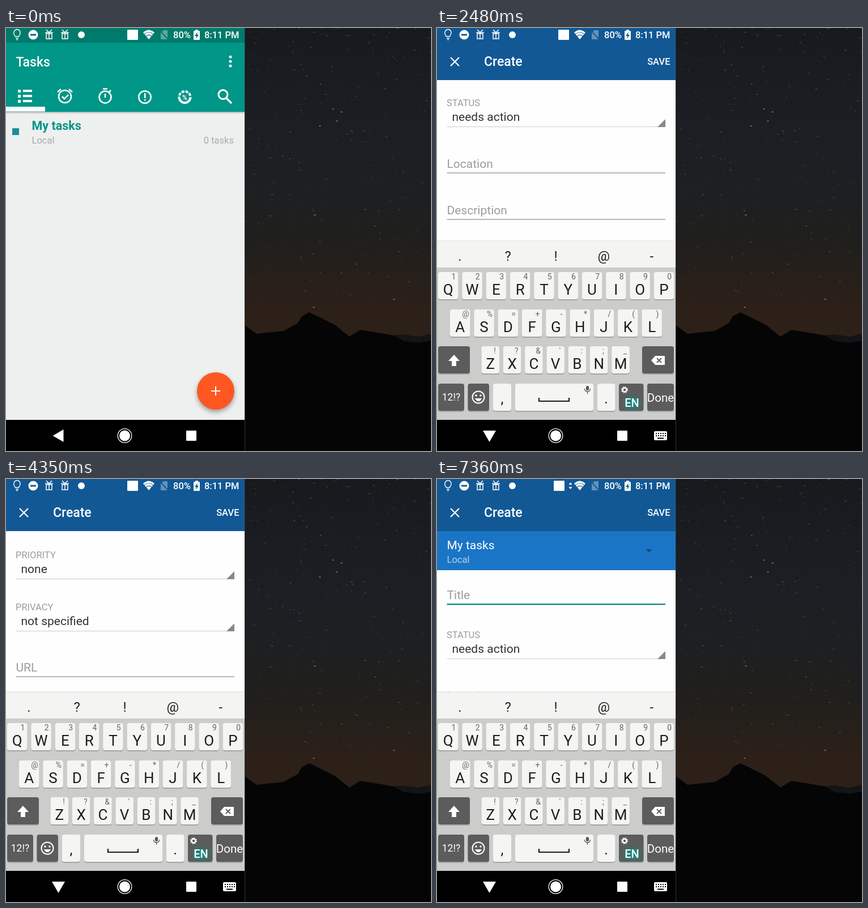
An HTML page that plays this animation: 750x747 px, repeating every 7.45 s.

```html
<!DOCTYPE html>
<html lang="en">
<head>
<meta charset="utf-8">
<title>Tasks</title>
<style>
html, body { margin: 0; width: 100%; height: 100%; overflow: hidden; background: #000; }
svg { display: block; width: 100%; height: 100%; }
text { font-family: Roboto, "Noto Sans", sans-serif; white-space: pre; }
</style>
</head>
<body>
<script>
const LOOP = 7450;
const W = '#fff', TEAL = '#009688', NAVY = '#125895', HINT = '#9c9c9c', INK = '#333';

// Markup helpers
const rect = (x, y, w, h, fill, r = 0, more = '') =>
  `<rect x="${x}" y="${y}" width="${w}" height="${h}" fill="${fill}" rx="${r}" ${more}/>`;
const circle = (x, y, r, fill, more = '') => `<circle cx="${x}" cy="${y}" r="${r}" fill="${fill}" ${more}/>`;
const ring = (x, y, r, width, more = '') =>
  circle(x, y, r, 'none', `stroke="${W}" stroke-width="${width}" ${more}`);
const shape = (d, fill) => `<path d="${d}" fill="${fill}"/>`;
const line = (d, stroke = W, width = 2) =>
  `<path d="${d}" fill="none" stroke="${stroke}" stroke-width="${width}"/>`;
const text = (x, y, s, size, fill, more = '') =>
  `<text x="${x}" y="${y}" font-size="${size}" fill="${fill}" ${more}>${s.replace('&', '&amp;')}</text>`;
const group = (body, more = '') => `<g ${more}>${body}</g>`;
const move = (x, y, body) => group(body, `transform="translate(${x} ${y})"`);
const MID = 'text-anchor="middle"', END = 'text-anchor="end"', MEDIUM = 'font-weight="500"';

function wallpaper() {
  let seed = 7;
  const rnd = () => (seed = seed * 16807 % 2147483647) / 2147483647;
  let stars = '';
  for (let i = 0; i < 900; i++) {
    const x = rnd() * 750, y = 480 * rnd() ** 1.6, len = 1 + rnd() * 2.5;
    const tone = rnd() < .2 ? '#a08058' : '#a4a6a4';
    stars += `<path d="M${x.toFixed(1)} ${y.toFixed(1)}l${len.toFixed(1)} .5" stroke="${tone}" opacity="${(.08 + rnd() ** 3 * .5).toFixed(2)}"/>`;
  }
  const bright = [[554, 173], [584, 164], [577, 143], [592, 148], [545, 330], [543, 493], [685, 479]]
    .map(([x, y]) => rect(x - 1.5, y - .5, 3, 1.5, '#a5804c', .5)).join('');
  return rect(0, 0, 750, 747, 'url(#sky)') + stars + bright +
    shape('M660 545L700 541 728 545 750 540V580H660Z', '#131415') +
    shape('M0 495L30 495 45 505 80 522 110 518 150 505 190 512 225 512 238 488 272 487 285 500 318 512 345 493 367 478 385 490 390 512 412 518 442 540 490 535 515 521 522 509 535 502 552 510 580 524 606 545 625 533 650 537 685 543 702 553 730 556 750 552V747H0Z', '#050505');
}

// Status bar icons; dx moves the right-hand cluster
const nfc = rect(214, 3, 19, 18, W, 1);
function status(dx, showNfc) {
  const parcel = x => line(`M${x - 5} 10h10v9h-10zM${x - 7} 8h14M${x} 8v11M${x} 8l-5-5M${x} 8l5-5`, W, 1.5);
  const right = (showNfc ? nfc : '') +
    shape('M242 8Q251.500 -1 262 8L252 20Z', W) +
    line('M244 11Q252 4 260 11M247 14.500Q252 10 257 14.500', '#3c7ba5', 1.200) +
    group(shape('M273 9L278 4H285V20H273Z', W) + line('M271 4L286 20', '#2a6d90', 2), 'opacity=".35"') +
    text(295, 18, '80%', 16.500, W, MEDIUM) +
    rect(331, 5, 11, 16, W, 1) + rect(334, 3, 5, 3, W) +
    shape('M338 7L333 14H336L335 19 340 12H337Z', '#126377') +
    text(411.500, 18, '8:11 PM', 16.500, W, MEDIUM + ' ' + END);
  return line('M16.500 15Q13 11 14 7Q16 2.500 19.500 2.500Q23.500 2.500 25 7Q25.500 11 22.500 15ZM17 18H22M18 20.500H21', W, 1.400) +
    circle(48, 12, 8.500, W) + rect(43, 10.500, 10, 3, '#16627e') +
    parcel(76) + parcel(104) + circle(133, 12, 6, W) + move(dx, 0, right);
}

// System navigation
const back = (x, y) => shape(`M${x - 10} ${y}L${x + 9} ${y - 11}V${y + 11}Z`, W);
const home = (x, y) => ring(x, y, 12.300, 1.300) + circle(x, y, 9.500, W);
const square = (x, y) => rect(x - 9, y - 9, 18, 18, W, 1);

function keyboardIcon() {
  let dots = '';
  for (let i = 0; i < 10; i++) dots += rect(386 + i % 5 * 4, 715 + (i / 5 | 0) * 4, 2, 2, '#000');
  return rect(383, 712, 23, 16, W, 2) + dots + rect(389, 723.500, 11, 2, '#000');
}

function listScreen() {
  const bullets = [109, 118, 127].map(y => rect(21, y, 5, 5, W) + rect(30, y, 16, 4, W)).join('');
  const tabs = bullets +
    ring(104, 121, 11, 2.500) + line('M99 121l4 4 7-7M91 113l6-5M117 113l-6-5', W, 2.500) +
    ring(175, 122, 10.500, 2.500) + line('M171 107.500h8M175 116v7M182 113l3-3', W, 2.500) +
    ring(245, 122, 10.800, 2.500) + rect(244, 115, 2.500, 9, W) + rect(244, 126, 2.500, 2.500, W) +
    ring(315.500, 122, 10, 4, 'stroke-dasharray="32 2 5 2 5 2 5 2 5 3"') + text(315.500, 126.500, '%', 12, W, MID + ' font-weight="700"') +
    ring(383, 117.500, 8, 3) + line('M389 124l9 9', W, 3.500);
  return rect(0, 0, 421, 692, '#eef0ef') +
    rect(0, 147, 421, 5, 'url(#shade)') + rect(0, 25, 421, 123, TEAL) + rect(0, 0, 421, 26, '#007a6b') +
    text(17.500, 67.500, 'Tasks', 23, W, MEDIUM) +
    [51, 59, 67].map(y => circle(396, y, 2.500, W)).join('') + tabs + rect(0, 139, 69, 8.500, W) +
    rect(11, 177, 12, 12, '#1f8c98') + text(45.500, 180, 'My tasks', 21.500, TEAL, 'font-weight="700"') +
    text(45.500, 203.500, 'Local', 16.500, '#a9aaaa') + text(402, 203.500, '0 tasks', 16.500, '#a9aaaa', END) +
    circle(370, 645, 33, '#000', 'opacity=".35" filter="url(#blur)"') + circle(370, 641, 33, '#ff5722') +
    circle(370, 641, 0, W, 'id="ripple" opacity=".3"') + line('M362 641h16M370 633v16', W, 2);
}

// Form laid out from the top of the unscrolled page; w is the page width
function form(w) {
  const right = w - 18;
  const corner = (x, y) => shape(`M${x} ${y}h-14l14-14z`, '#888');
  const label = (y, s, x = 17) => text(x, y + 6, s, 16.500, HINT);
  const hint = (y, s) => text(17.500, y + 7, s, 21, HINT) + rect(17.500, y + 15.500, right - 17.500, 1.200, '#8a8a8a');
  const select = (y, name, value) => label(y, name) + text(26.500, y + 32, value, 21, INK) +
    rect(17.500, y + 42, right - 17.500, 1, '#ccc') + corner(right, y + 43);
  const date = (y, name) => rect(13, y + 2, 188, 51, '#dddedc') + rect(206, y + 2, 150, 51, '#dddedc') +
    rect(17, y + 52, 184, 1, '#bbb') + rect(210, y + 52, 146, 1, '#bbb') +
    corner(201, y + 52) + corner(356, y + 52) + label(y, name) +
    line(`M376 ${y + 21}l16 16m0-16l-16 16`, '#666', 2);
  return rect(0, 92, w, 1060, '#fefefe') + rect(0, 90, w, 71, '#1a75c6') +
    text(17.500, 124, 'My tasks', 21, W) + text(17.500, 147.500, 'Local', 16.500, '#b4d3ee') +
    shape(`M${w - 53} 124h12l-6 6z`, '#164a78') +
    text(17.500, 212, 'Title', 21, HINT) + rect(17.500, 220, right - 17.500, 2.400, '#148a8c') +
    select(275, 'STATUS', 'needs action') + hint(383, 'Location') + hint(465, 'Description') +
    date(545, 'START') + date(637, 'DUE') +
    `<rect x="22" y="737" width="18.500" height="18.500" rx="1" fill="none" stroke="#777" stroke-width="2.200"/>` +
    label(746, 'ALL DAY', 50) + select(809, 'TIME ZONE', '(GMT+08:00) Taipei') +
    select(901, 'PRIORITY', 'none') + select(993, 'PRIVACY', 'not specified') + hint(1100, 'URL');
}

const toolbar = (w, h, y, size) => rect(0, 0, w, h, NAVY) +
  line(`M24 ${y - 7}l15 15m0-15l-15 15`, W, 2.300) +
  text(83, y + size * .36, 'Create', size, W, MEDIUM) +
  text(w - 9.500, y + 6, 'SAVE', 16.500, W, MEDIUM + ' ' + END);

function keyboard() {
  const LIGHT = '#f5f5f3', DARK = '#5b5c5b';
  const key = (x, y, w, fill) => rect(x, y + 2, w, 48, '#a5a6a4', 4) + rect(x, y, w, 48, fill, 4);
  const row = (letters, hints, x, y, step, w) => [...letters].map((c, i) => {
    const k = x + i * step;
    return key(k, y, w, LIGHT) + text(k + w / 2, y + 40, c, 26, '#1c1c1c', MID) +
      text(k + w - 8, y + 13, hints[i], 14, '#666', MID);
  }).join('');
  const marks = [...'.?!@-'].map((c, i) => text(40.500 + i * 84.600, 411, c, 24, '#222', MID)).join('');
  return rect(0, 376, 421, 316, '#cccdcb') + rect(0, 376, 421, 47, '#f4f4f2') + rect(0, 375.500, 421, 1, '#ddd') + marks +
    row('QWERTYUIOP', '1234567890', 2, 431, 42.300, 35.500) +
    row('ASDFGHJKL', '@%=+-*/()', 23, 497, 42.300, 35.500) +
    row('ZXCVBNM', "!?&':;_", 78.500, 562, 38.300, 31.500) +
    key(2, 562, 56, DARK) + shape('M30 577l10 11h-6v9h-8v-9h-6z', W) +
    key(362, 562, 56, DARK) + shape('M378 587l7-8h17v16h-17z', W) + line('M388 583l8 8m0-8l-8 8', DARK, 2) +
    key(2, 628, 46, DARK) + text(25, 658, '12!?', 17.500, W, MID) +
    key(54.500, 628, 37.500, DARK) + ring(73, 652, 10.500, 2) + circle(69, 649, 1.700, W) + circle(77, 649, 1.700, W) +
    shape('M67 654h12q-2 5-6 5t-6-5z', W) +
    key(99, 628, 32, LIGHT) + text(115, 663, ',', 25, '#1c1c1c', MID) +
    key(138, 628, 138, LIGHT) + line('M180 653v6h53v-6', '#1c1c1c', 2.200) +
    rect(263, 632, 5, 8, '#555', 2.500) + line('M260.500 637q0 5 5 5t5-5M265.500 642v4', '#555', 1.300) +
    key(283, 628, 31.500, LIGHT) + text(298.500, 663, '.', 25, '#1c1c1c', MID) +
    key(321, 628, 43.500, DARK) + rect(333, 654, 23, 16, '#0e8f88', 3, 'filter="url(#blur)"') + ring(331, 639, 3.500, 2.500) +
    ring(331, 639, 5.300, 1.500, 'stroke-dasharray="2 2.160"') +
    text(344, 669, 'EN', 20, W, MID + ' ' + MEDIUM) +
    key(371, 628, 47, DARK) + text(394.500, 660, 'Done', 20.500, W, MID);
}

function landscape() {
  return rect(0, 0, 750, 458, '#000') +
    group(move(0, -9, form(693)) + toolbar(693, 82, 54, 16.500), 'clip-path="url(#page)"') + status(273, true) +
    square(722, 91) + home(722, 209) + back(722, 326) +
    rect(0, 420, 750, 38, '#4696e3') + line('M127 432.500l-6 6 6 6', W, 3) + ring(374, 438.500, 6, 2) +
    [434, 438.500, 443].map(y => rect(618, y - 1, 13, 2.200, W)).join('');
}

const gradient = (id, stops) => `<linearGradient id="${id}" x2="0" y2="1">` +
  stops.map(([at, c, o = 1]) => `<stop offset="${at}" stop-color="${c}" stop-opacity="${o}"/>`).join('') + '</linearGradient>';

document.body.innerHTML = `<svg viewBox="0 0 750 747"><defs>` +
  gradient('sky', [[0, '#17191d'], [.25, '#1b1f24'], [.42, '#1e1f20'], [.53, '#211f1c'], [.64, '#2b2019'], [.7, '#2d2018'], [1, '#2d2018']]) +
  gradient('shade', [[0, '#000', .3], [1, '#000', 0]]) +
  `<filter id="blur" x="-50%" y="-50%" width="200%" height="200%"><feGaussianBlur stdDeviation="4"/></filter>
  <clipPath id="page"><rect width="694" height="420"/></clipPath></defs>` +
  wallpaper() +
  group(rect(0, 0, 421, 747, '#000') + rect(421, 0, 1, 747, '#303132') +
    rect(203, 527, 108, 57, '#2c2c2c', 28.500) + back(257, 556) + home(374, 556), 'id="turning"') +
  group(
    rect(421, 0, 1, 747, '#303132') + group(listScreen(), 'id="list"') +
    group(group(form(421) + group(rect(17, 191, 2, 26, '#148a8c'), 'id="cursor"'), 'id="form"') +
      toolbar(421, 92, 59, 23), 'id="create"') +
    group(shape('M0 -15Q210.500 -39 421 -15V0H0Z', TEAL), 'id="glow"') +
    group(rect(0, 376, 421, 316, '#fafbfa'), 'id="backing"') +
    rect(0, 692, 421, 55, '#000') + group(keyboard(), 'id="keyboard"') +
    group(back(92.500, 720), 'id="back"') +
    group(shape('M81 711H104L92.500 731Z', W) + keyboardIcon(), 'id="hide"') +
    home(209.500, 720) + square(327, 720) + status(0, false) + group(nfc, 'id="nfc"') +
    group(shape('M232.500 10l3-4 3 4zM232.500 14h6l-3 4z', W), 'id="traffic"'), 'id="portrait"') +
  group(landscape(), 'id="landscape"') + '</svg>';

const el = id => document.getElementById(id);
const show = (id, on) => el(id).setAttribute('opacity', +on);
const place = (id, value) => el(id).setAttribute('transform', value);
const part = (t, a, b) => Math.min(1, Math.max(0, (t - a) / (b - a)));
const easeOut = p => 1 - (1 - p) ** 3;

const SPANS = [[1070, 1780, 10], [1860, 2340, 7], [2480, 3200, 10], [3260, 3990, 10], [6440, 6980, 8], [7130, 7360, 4]];
function snap(t) {
  for (const [a, b, n] of SPANS) {
    if (t < a || t > b) continue;
    const step = (b - a) / (n - 1);
    return a + Math.floor((t - a) / step + .1) * step;
  }
  return t;
}

// Two flings: the first rests at the dates, the second hits the end of the page
const REST = 566, BOTTOM = 767;
function scrollAt(t) {
  if (t < 2480 || t >= 6440) return 0;
  const first = REST * easeOut(part(t, 2400, 3264));
  return t < 3260 ? first : first + (BOTTOM - REST) * easeOut(part(t, 3180, 3420));
}

function draw(time) {
  const t = snap(time);
  const wide = t >= 5370 && t < 6440;
  show('landscape', wide);
  show('turning', t >= 6440 && t < 6980);
  show('portrait', wide ? 0 : t < 6440 ? 1 : part(t, 6560, 6840));

  const press = part(t, 1050, 1270);
  el('ripple').setAttribute('r', 33 * press);
  show('ripple', press ? .3 * (1 - part(t, 1270, 1480)) : 0);

  const enter = part(t, 1270, 1460);
  show('create', enter);
  place('create', `translate(0 ${60 * (1 - easeOut(enter))})`);
  place('form', `translate(0 ${-scrollAt(t)})`);
  show('cursor', t > 1500 && t < 2180);

  const glow = t < 3415 || t > 3990 ? 0 : 1 - part(t, 3422, 3960);
  show('glow', .36 * glow);
  place('glow', `translate(0 376) scale(1 ${glow})`);

  const rise = t < 6440 ? part(t, 1505, 1780) : t < 7130 ? 0 : part(t, 6935, 7210);
  show('backing', rise > 0);
  show('keyboard', rise);
  place('keyboard', `translate(0 ${Math.round(105 * (1 - rise))})`);
  const ime = t >= 1540 && t < 5370 || t >= 6975;
  show('back', !ime);
  show('hide', ime);

  const late = t >= 6975;
  place('nfc', `translate(${late ? -8 : 0} 0)`);
  show('traffic', late);
}

const start = performance.now();
function tick() {
  draw((performance.now() - start) % LOOP);
  requestAnimationFrame(tick);
}
tick();
</script>
</body>
</html>
```
